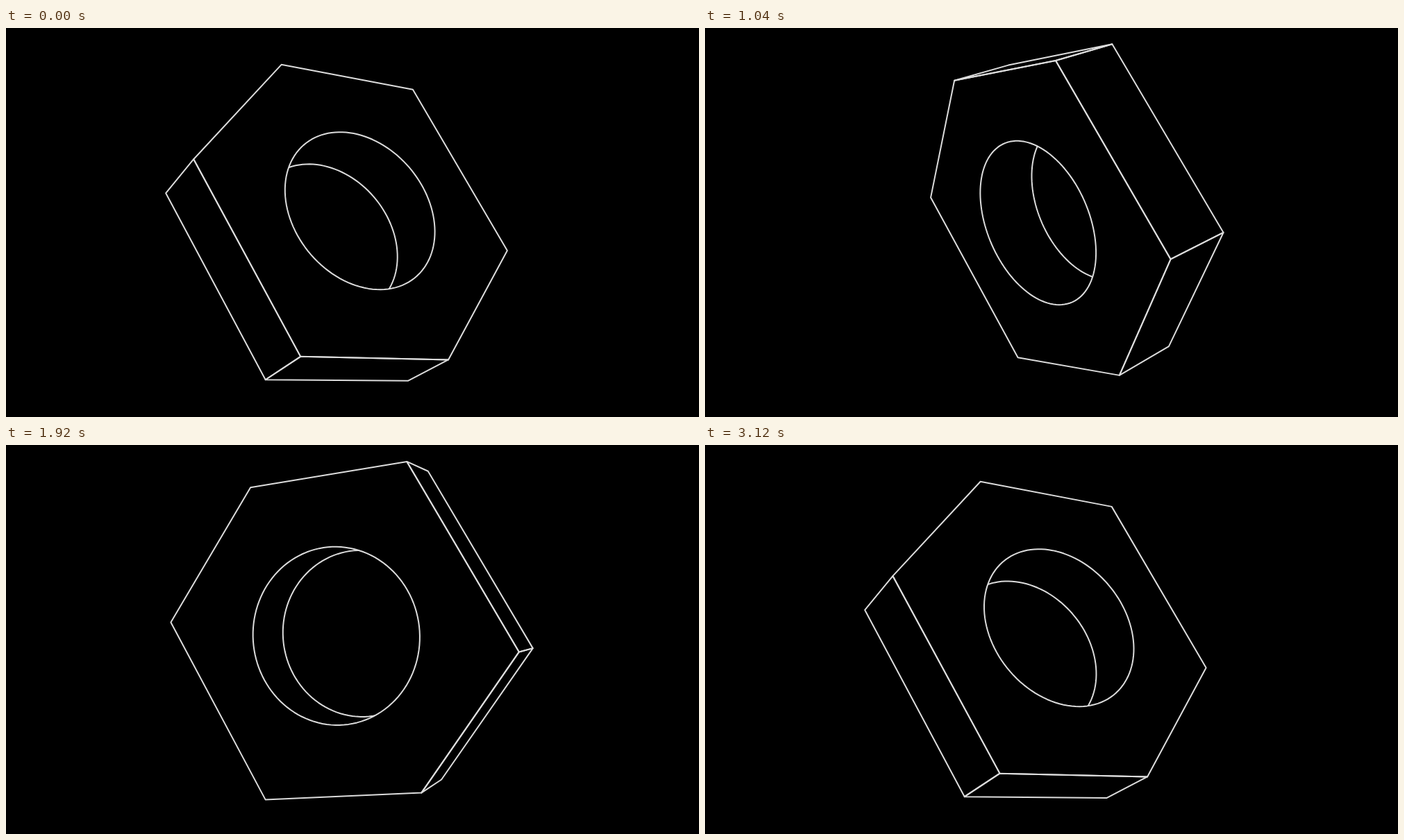
An HTML page with a canvas that plays this animation: 998 px wide and 561 px high, repeating every 3.2 s.

```html
<!DOCTYPE html>
<html lang="en">
<head>
<meta charset="utf-8">
<title>Turning nut</title>
<style>
  html, body { margin: 0; width: 100%; height: 100%; overflow: hidden; background: #000; }
  canvas { display: block; }
</style>
</head>
<body>
<canvas id="stage" width="998" height="561"></canvas>
<script>
const ctx = document.getElementById('stage').getContext('2d');
const rad = deg => deg * Math.PI / 180;

// Timing in ms: one eased turn, then a short hold
const LOOP = 3200, STEP = 80, TURN = 3156;
const START = 39.1;

// The nut: "a" runs along the turning axis, "b" across it, "n" through the thickness
const APEX = 242.9, EDGE = 146.1, HALF = 209.5, HOLE = 122.5;
const FRONT = 31.1, BACK = -72.4;

// Camera and axis
const DIST = 1420, TILT = rad(8.2), LEAN = rad(60.67);
const SHIFT_U = -6.7, SHIFT_V = 2.8;
const CX = 499, CY = 280.5;

const hexagon = [[-APEX, 0], [-EDGE, HALF], [EDGE, HALF], [APEX, 0], [EDGE, -HALF], [-EDGE, -HALF]];
const circle = Array.from({ length: 120 }, (_, i) => {
  const t = rad(i * 3);
  return [HOLE * Math.cos(t), HOLE * Math.sin(t)];
});

function project(a, b, n, turn) {
  const v = b * Math.cos(turn) + n * Math.sin(turn);
  const w = n * Math.cos(turn) - b * Math.sin(turn);
  const u = a * Math.cos(TILT) - w * Math.sin(TILT);
  const z = a * Math.sin(TILT) + w * Math.cos(TILT);
  const k = DIST / (DIST - z);
  const pu = (u + SHIFT_U) * k, pv = (v + SHIFT_V) * k;
  return [
    CX + pu * Math.cos(LEAN) + pv * Math.sin(LEAN),
    CY + pu * Math.sin(LEAN) - pv * Math.cos(LEAN)
  ];
}

function area(pts) {
  return pts.reduce((sum, [x, y], i) => {
    const [nx, ny] = pts[(i + 1) % pts.length];
    return sum + x * ny - nx * y;
  }, 0);
}

function outline(pts) {
  const path = new Path2D();
  pts.forEach(([x, y]) => path.lineTo(x, y));
  path.closePath();
  return path;
}

function drawFace(hex, near, far) {
  const rim = outline(near);
  ctx.stroke(outline(hex));
  ctx.stroke(rim);
  // The far rim shows only through the hole
  ctx.save();
  ctx.clip(rim);
  ctx.stroke(outline(far));
  ctx.restore();
}

function draw(ms) {
  const p = Math.min(ms / TURN, 1);
  const turn = rad(START - 360 * p * p * (3 - 2 * p));
  const place = (pts, n) => pts.map(([a, b]) => project(a, b, n, turn));
  const hexF = place(hexagon, FRONT), hexB = place(hexagon, BACK);
  const rimF = place(circle, FRONT), rimB = place(circle, BACK);

  ctx.fillStyle = '#000';
  ctx.fillRect(0, 0, 998, 561);
  ctx.strokeStyle = '#dcdcdc';
  ctx.lineWidth = 2;
  ctx.lineJoin = 'round';

  hexF.forEach((pt, i) => {
    const j = (i + 1) % 6;
    const side = [pt, hexB[i], hexB[j], hexF[j]];
    if (area(side) > 0) ctx.stroke(outline(side));
  });
  if (area(hexF) > 0) drawFace(hexF, rimF, rimB);
  if (area(hexB) < 0) drawFace(hexB, rimB, rimF);
}

function tick() {
  const ms = performance.now() % LOOP;
  draw(Math.floor(ms / STEP) * STEP);
  requestAnimationFrame(tick);
}
tick();
</script>
</body>
</html>
```
